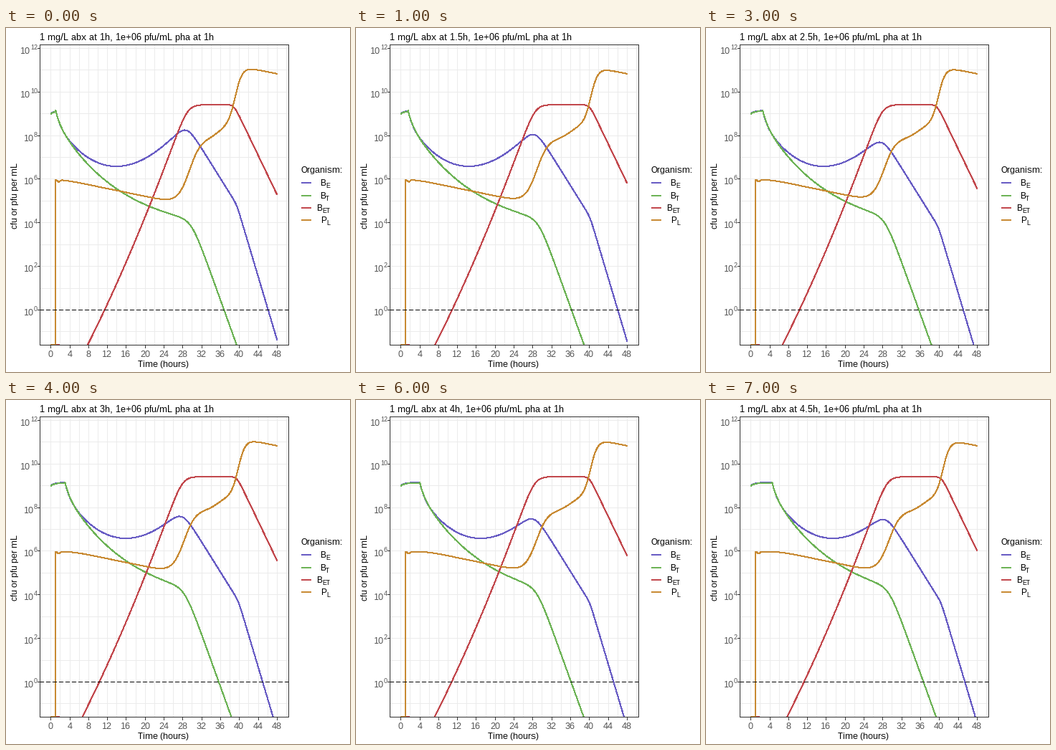
Recreate the animation shown at these times as a matplotlib script. Size 480 by 480 pixels, loop 8 s.

```python
import numpy as np
import matplotlib.pyplot as plt
from matplotlib.animation import FuncAnimation
from matplotlib.patches import Rectangle

plt.rcParams.update({
    "font.family": "Liberation Sans",
    "text.hinting": "native",
    "text.hinting_factor": 1,
})

SIZE, DPI = 480, 96
PT = 72 / DPI                            # points per pixel
LEFT, TOP, RIGHT, BOTTOM = 47, 23, 394, 442
X0, HOUR = 62.7, 6.575                   # time axis: pixel of 0 h, pixels per hour
Y0, DECADE = 393.5, 30.42                # log axis: pixel of 10^0, pixels per decade
FLOOR = -1.58                            # lowest level shown
BLUE, GREEN, RED, ORANGE = "#685cc4", "#6db356", "#c2484d", "#c88a33"
GRID, DARK, GREY = "#ebebeb", "#333333", "#4d4d4d"

t = np.linspace(0, 48, 1441)


def soft_min(a, b, width):
    return -width * np.logaddexp(-a / width, -b / width)


def step(center, width):
    return 1 / (1 + np.exp((center - t) / width))


def delays(dose):
    """Shift in hours of the middle and the final phase."""
    mid = 0.35 * (dose - 2.8) ** 2 - 0.15
    return mid, mid - 1.75 * np.exp(8 * (1 - dose))


def before_and_after(dose, level, decline):
    """Early growth to a level, replaced by the decline after the dose."""
    return np.where(t < dose, level - 0.13 * np.exp(-1.3 * t), decline)


# Each curve is log10 of the count over time for one antibiotic time.
def only_e(dose):
    _, late = delays(dose)
    v = t - dose - 12.9                  # hours since the lowest point
    valley = 6.59 + 0.0105 * v ** 2 - 0.0001 * v ** 3
    valley = valley + 0.6 * np.exp(-np.maximum(t - dose, 0))
    kink_t = 39.87 + 0.6 * late
    kink = 3.63 + 1.22 * np.exp((1 - dose) / 0.8)
    fall = soft_min(kink - 0.345 * (t - kink_t),
                    kink - 0.725 * (t - kink_t), 0.1)
    return before_and_after(dose, 9.15, soft_min(valley, fall, 0.45))


def only_t(dose):
    mid, _ = delays(dose)
    u = np.maximum(t - dose, 0)
    decay = 3.5 + 5.19 * np.exp(-u / 14) + 0.46 * np.exp(-u / 0.9)
    fall = -0.6 * (t - 35.76 - mid)
    return before_and_after(dose, 9.13, soft_min(decay, fall, 0.5))


def both(dose):
    mid, late = delays(dose)
    u = t - 10.4 - mid
    rise = soft_min(0.46 * u + 0.0043 * u ** 2, 9.418, 0.5)
    fall = 9.418 - 0.45 * (t - 39.58 - late)
    return np.where(t < 1.75, FLOOR, soft_min(rise, fall, 0.17))


def phage(dose):
    mid, late = delays(dose)
    level = soft_min(6.06 - 0.0447 * (t - dose), 5.98, 0.05)
    level = level - 0.09 * np.exp(-((t - 1.65) / 0.35) ** 2)
    level = (level + (3.24 - 0.0447 * dose) * step(28.4 + mid, 1.25)
             + 0.98 * step(35.6 + (mid + late) / 2, 1.4)
             + 2.7 * step(39.9 + late, 0.75))
    return np.where(t < 1, FLOOR, level)


fig = plt.figure(figsize=(SIZE / DPI, SIZE / DPI), dpi=DPI, facecolor="white")
ax = fig.add_axes([0, 0, 1, 1])
ax.set(xlim=(0, SIZE), ylim=(SIZE, 0))
ax.axis("off")


def line(xs, ys, color, width=1, **style):
    return ax.plot(xs, ys, color=color, lw=width * PT, antialiased=False,
                   solid_capstyle="butt", **style)[0]


def text(x, y, label, size=12, color="black", **style):
    return ax.text(x, y, label, fontsize=size * PT, color=color,
                   va="baseline", **style)


# Grid, ticks and tick labels
for hour in range(0, 51, 2):
    x = int(X0 + hour * HOUR)
    if x < RIGHT - 1:
        line([x, x], [TOP, BOTTOM], GRID, zorder=1)
    if hour % 4 == 0 and hour <= 48:
        line([x, x], [443, 446], DARK)
        text(x, 459, str(hour), color=GREY, ha="center")
for power in range(-1, 13):
    y = int(Y0 - power * DECADE)
    line([LEFT, RIGHT], [y, y], GRID, zorder=1)
    if power >= 0 and power % 2 == 0:
        line([44, 47], [y, y], DARK)
        x = 30 - 5 * len(str(power))
        text(x, y + 8, "10", color=GREY)
        text(x + 14, y + 2, str(power), 9, GREY)

# Curves
panel = Rectangle((LEFT, TOP), RIGHT - LEFT, BOTTOM - TOP, fill=False,
                  ec=DARK, lw=PT, antialiased=False, zorder=6)
ax.add_patch(panel)
curves = []
for color, model in [(BLUE, only_e), (GREEN, only_t),
                     (RED, both), (ORANGE, phage)]:
    # Unsmoothed strokes of one pixel cover two pixels
    curve = line([], [], color, 1, zorder=4)
    curve.set_clip_path(panel)
    curves.append((curve, model))
line([LEFT, RIGHT], [int(Y0)] * 2, "black", zorder=5, dashes=(5, 3),
     dash_capstyle="butt")

# Titles and legend
title = text(47, 17, "", 13)
text(220, 473, "Time (hours)", ha="center")
ax.text(18, 234, "cfu or pfu per mL", fontsize=12 * PT, rotation=90,
        ha="right", va="center")
text(411, 202, "Organism:")
for i, (color, name, sub, x) in enumerate([
        (BLUE, "B", "E", 438), (GREEN, "B", "T", 438),
        (RED, "B", "ET", 433), (ORANGE, "P", "L", 439)]):
    y = round(216 + 17.5 * i)
    line([412, 426], [y, y], color, 2)
    text(x, y + 4, name)
    text(x + 8, y + 7, sub, 9)


def draw(k):
    dose = 1 + k / 2
    title.set_text(f"1 mg/L abx at {dose:g}h, 1e+06 pfu/mL pha at 1h")
    for curve, model in curves:
        curve.set_data(X0 + t * HOUR, Y0 - model(dose) * DECADE)
    return [title] + [curve for curve, _ in curves]


anim = FuncAnimation(fig, draw, frames=8, interval=1000, repeat=True,
                     repeat_delay=0)
plt.show()
```
